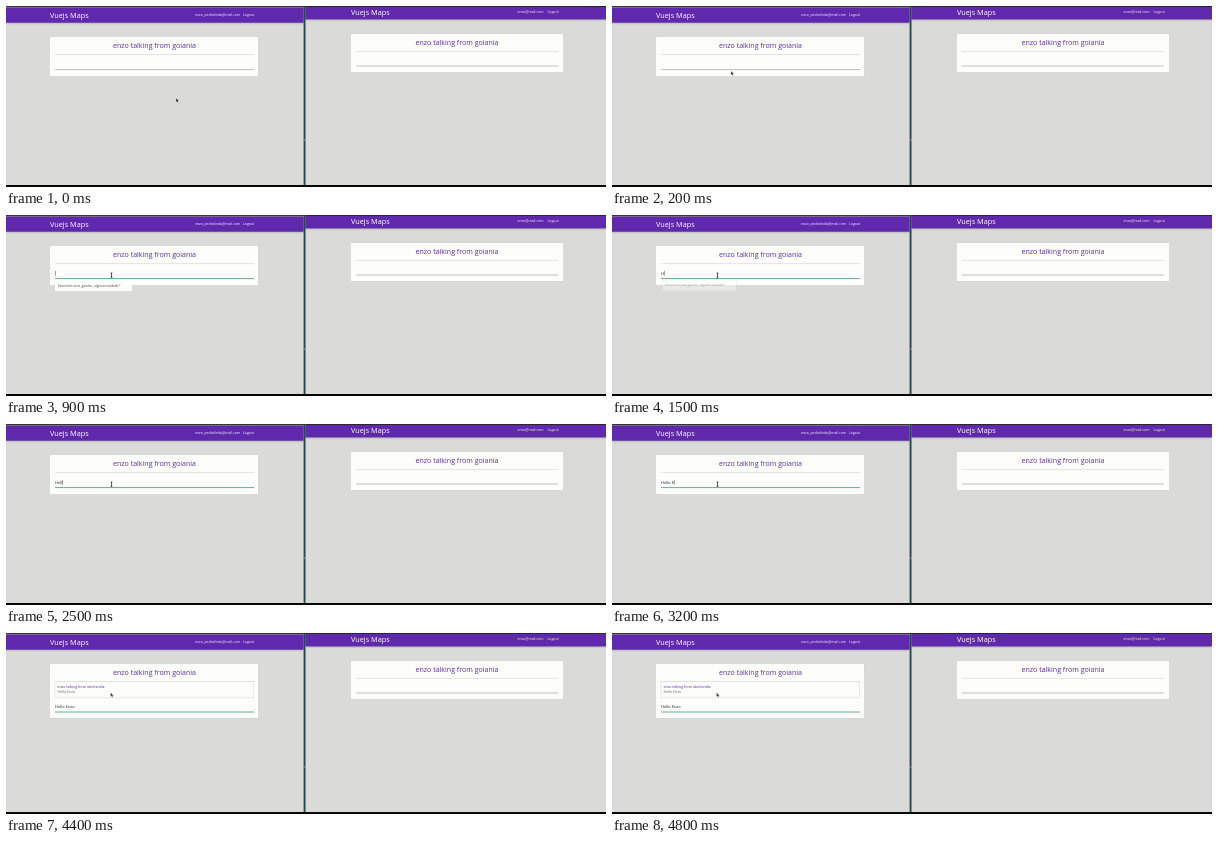
Recreate the animation shown at these times as an HTML page. Size 600 px wide and 181 px high, loop 5000 ms.

```html
<!DOCTYPE html>
<html lang="en">
<head>
<meta charset="utf-8">
<title>Chat between two windows</title>
<style>
  html, body { margin: 0; width: 100%; height: 100%; overflow: hidden; background: #dadad9; }
  svg { display: block; width: 600px; height: 181px; }
  text { font-family: "Open Sans", "Noto Sans", sans-serif; white-space: pre; }
  .brand { font-size: 7.3px; fill: #fff; }
  .nav { font-size: 3.5px; fill: #f4effb; }
  .title { font-size: 7.05px; fill: #5a2ba8; text-anchor: middle; }
  .card { fill: #fdfdfc; filter: drop-shadow(0 .6px .7px rgba(0,0,0,.38)); }
  .bar { fill: #6029ad; filter: drop-shadow(0 .6px .8px rgba(0,0,0,.4)); }
  .hr { stroke: #dedede; stroke-width: .8; }
  .line { stroke: #b2b2b1; stroke-width: .8; }
  .typed { font-size: 4px; fill: #222; }
</style>
</head>
<body>
<svg viewBox="0 0 600 181">
  <rect width="600" height="181" fill="#dadad9"/>

  <g id="left">
    <rect class="bar" y="1.5" width="297.5" height="15.2"/>
    <text class="brand" x="44" y="11.9">Vuejs Maps</text>
    <text class="nav" x="189" y="10.4">enzo_pedralinda@mail.com</text>
    <text class="nav" x="237" y="10.4">Logout</text>
    <rect id="card" class="card" x="44" y="31" width="208.5" height="39" rx=".7"/>
    <text class="title" x="148.5" y="42.4">enzo talking from goiania</text>
    <path class="hr" d="M49 48.6H248"/>
    <g id="message">
      <rect x="49" y="48.6" width="198.6" height="16.2" fill="none" stroke="#dedede" stroke-width=".7"/>
      <text x="51.5" y="55.1" font-size="3.5" fill="#5a2ba8">enzo talking from uberlandia</text>
      <text x="51.5" y="60.4" font-size="3.6" fill="#666">Hello Enzo</text>
    </g>
    <g id="field">
      <text id="typed" class="typed" x="49" y="59.6"></text>
      <rect id="caret" y="56" width=".5" height="4.6" fill="#333"/>
      <path id="under" class="line" d="M49 63.6H248"/>
    </g>
    <g id="hint">
      <rect class="card" x="49" y="65" width="77" height="11"/>
      <text x="52" y="71.5" font-size="3" fill="#444">Estou bem enzo_goiania , alguma novidade ?</text>
    </g>
  </g>

  <g id="right">
    <rect class="bar" x="299.5" y=".6" width="300.5" height="12.8"/>
    <text class="brand" x="345" y="9">Vuejs Maps</text>
    <text class="nav" x="511.5" y="7.4">enzo@mail.com</text>
    <text class="nav" x="541.5" y="7.4">Logout</text>
    <rect class="card" x="345" y="27.6" width="212" height="39" rx=".7"/>
    <text class="title" x="451" y="39">enzo talking from goiania</text>
    <path class="hr" d="M350 45.4H552"/>
    <path class="line" d="M350 60H552"/>
  </g>

  <rect width="600" height=".8" fill="#111"/>
  <rect y="1" width="297.5" height=".6" fill="#6d6580"/>
  <rect x="297.6" width="1.9" height="181" fill="#23494c"/>
  <rect x="298.2" y="133.5" width="1.3" height="1" fill="#a9b9b9"/>
  <rect y="179" width="600" height="2" fill="#050505"/>

  <path id="arrow" d="M0 0V4.2L1 3.3L1.7 4.8L2.4 4.5L1.8 3.1H3Z" fill="#222" stroke="#fff" stroke-width=".3"/>
  <path id="beam" d="M-.9 -2.2H.9M0 -2.2V2.2M-.9 2.2H.9" fill="none" stroke="#222" stroke-width=".75"/>
</svg>
<script>
const LOOP = 5000, SENT = 4400;
const $ = id => document.getElementById(id);
const show = (id, on) => $(id).setAttribute("visibility", on ? "visible" : "hidden");
const move = (id, x, y) => $(id).setAttribute("transform", `translate(${x} ${y})`);

// time of each key press
const phrase = "Hello Enzo";
const keys = [1300, 1900, 2000, 2500, 2600, 2800, 3200, 3300, 3500, 3800];

// time, x, y of the pointer
const pointer = [[0, 170, 92], [100, 152, 81], [200, 119, 65], [300, 107, 60.6], [700, 105.5, 60.2]];

function draw(t) {
  const step = Math.floor(t / 100) * 100;
  const sent = step >= SENT;

  const [, x, y] = pointer.filter(p => p[0] <= step).pop();
  const onField = step >= 300 && !sent;
  show("arrow", !onField);
  show("beam", onField);
  move("arrow", sent ? 104.6 : x, sent ? 59.6 : y);
  move("beam", x, y);

  const typed = $("typed");
  typed.textContent = phrase.slice(0, keys.filter(k => k <= step).length);
  $("caret").setAttribute("x", 49 + typed.getComputedTextLength());
  show("caret", step >= 700 && !sent);

  const focus = step >= 900;
  $("under").style.stroke = focus ? "#5fae98" : "";
  $("under").style.strokeWidth = focus ? 1 : "";

  const fade = Math.min(1, Math.max(0, (step - 1200) / 500));
  show("hint", focus && fade < 1);
  $("hint").setAttribute("opacity", 1 - fade);
  $("hint").setAttribute("transform",
    `translate(87.5 70.5) scale(${1 - fade * 0.06}) translate(-87.5 -70.5)`);

  show("message", sent);
  move("field", 0, sent ? 15.4 : 0);
  $("card").setAttribute("height", sent ? 54.3 : 39);
}

function tick() {
  draw(performance.now() % LOOP);
  requestAnimationFrame(tick);
}
tick();
</script>
</body>
</html>
```
